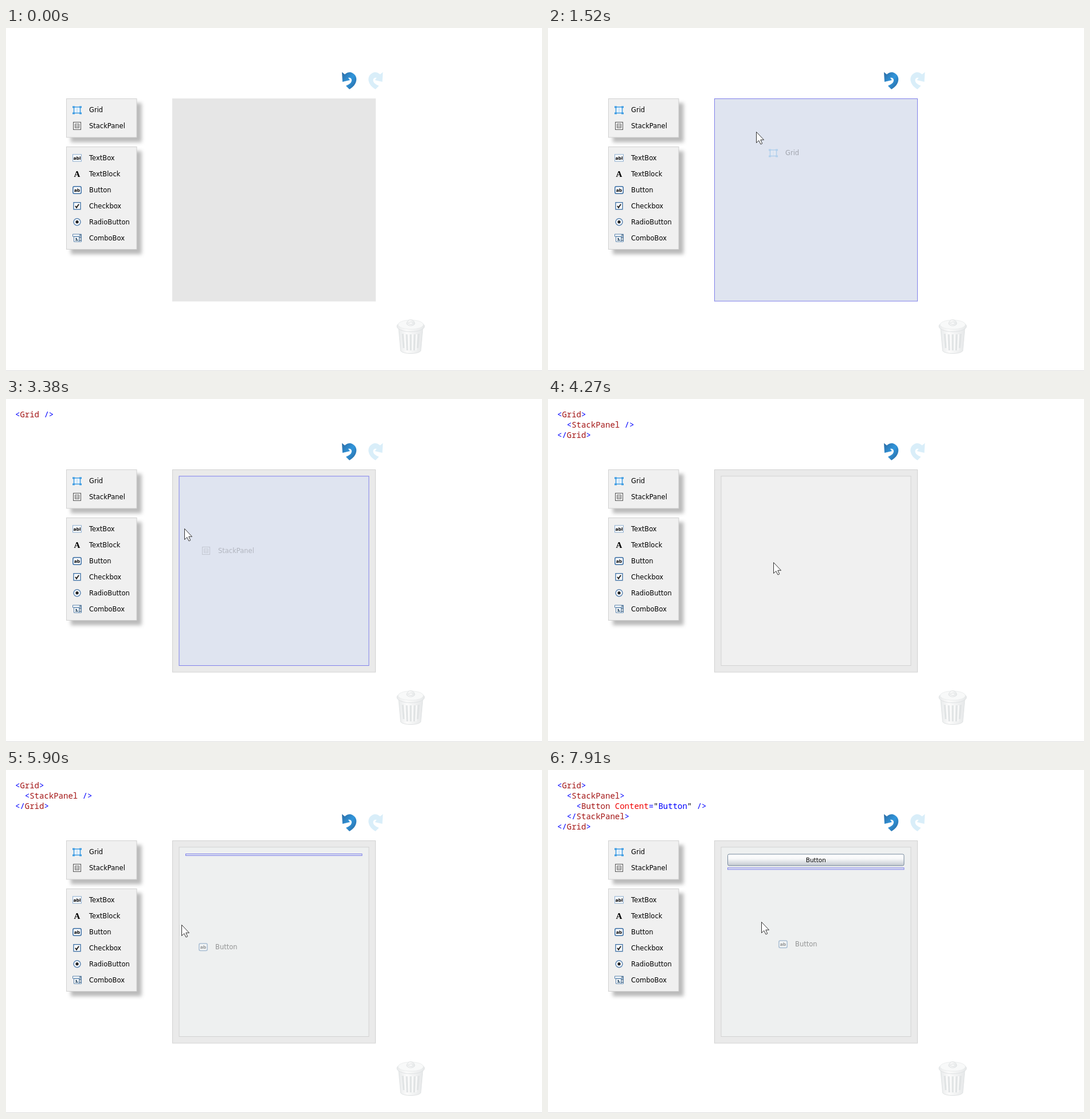
An HTML page that plays this animation: 935 by 599 pixels, repeating every 8 s.

```html
<!DOCTYPE html>
<html lang="en">
<head>
<meta charset="utf-8">
<title>Drag and drop designer</title>
<style>
  html, body { margin: 0; width: 100%; height: 100%; overflow: hidden; background: #fff; }
  svg { position: absolute; left: 0; top: 0; }
  text { font: 11.5px "DejaVu Sans", sans-serif; }
  pre { position: absolute; left: 16px; top: 18px; margin: 0;
        font: 14px/18px "Noto Sans Mono", monospace; color: #00f; }
  pre b { font-weight: normal; color: #a31515; }
  pre i { font-style: normal; color: #f00000; }
  pre u { text-decoration: none; color: #000; }
  .panel { fill: #f0f0f0; stroke: #d0d0d0; filter: drop-shadow(8px 8px 3px rgba(0, 0, 0, .27)); }
  .tiny { font-size: 7.5px; font-weight: bold; text-anchor: middle; }
</style>
</head>
<body>
<svg width="935" height="599" viewBox="0 0 935 599">
  <defs>
    <linearGradient id="blue" x2="1" y2="1">
      <stop stop-color="#2c6ba3"/><stop offset=".5" stop-color="#3196dc"/><stop offset="1" stop-color="#28649a"/>
    </linearGradient>
    <linearGradient id="face" x2="0" y2="1">
      <stop stop-color="#fff"/><stop offset=".4" stop-color="#f7f8f9"/><stop offset="1" stop-color="#c3c9d0"/>
    </linearGradient>
    <linearGradient id="metal">
      <stop stop-color="#e9ebec"/><stop offset=".35" stop-color="#fbfbfb"/><stop offset="1" stop-color="#e6e8e9"/>
    </linearGradient>
    <path id="arrow" d="M586 77l5 4c4-4 10-5 14-2 5 3 7 8 6 13-1 6-5 11-12 15l-6-6c7-3 10-6 10-10 0-3-3-5-6-4l3 4-13 3z"/>

    <g id="Grid-icon" fill="none" stroke="#3c9be2">
      <rect x="-5.5" y="-5" width="11" height="10.5" fill="#eaf4fc" stroke-width="1.5"/>
      <path d="M0-5V5" stroke="#8ac3ee" stroke-dasharray="2 1"/>
      <path d="M-8-5h4M4-5h4M-8 6h4M4 6h4" stroke-width="3"/>
    </g>
    <g id="StackPanel-icon" fill="none" stroke="#555">
      <rect x="-6.5" y="-6.5" width="13" height="13"/>
      <path d="M-3.5-3.5h7v7h-7zM-3-1h6M-3 1.5h6" stroke="#777"/>
    </g>
    <g id="TextBox-icon">
      <rect x="-7.5" y="-6" width="15" height="12" fill="#f8fbff" stroke="#8eaed0"/>
      <text class="tiny" y="3">abl</text>
    </g>
    <g id="TextBlock-icon">
      <text y="5" text-anchor="middle" style="font:bold 15px 'Liberation Serif',serif">A</text>
    </g>
    <g id="Button-icon">
      <rect x="-7.2" y="-6" width="14.4" height="12.4" rx="2.5" fill="#f8fbff" stroke="#3c6fa4" stroke-width="1.5"/>
      <text class="tiny" y="3">ab</text>
    </g>
    <g id="Checkbox-icon" fill="none">
      <rect x="-6" y="-6" width="12" height="12" fill="#fff" stroke="#4777a8" stroke-width="1.4"/>
      <path d="M-3 0l2 3 4-6" stroke="#222" stroke-width="2"/>
    </g>
    <g id="RadioButton-icon">
      <circle r="6" fill="#f8fbff" stroke="#6189b4" stroke-width="1.5"/><circle r="2.6" fill="#222"/>
    </g>
    <g id="ComboBox-icon" fill="#fff" stroke="#5680aa">
      <path d="M-7.5-6.5h15v4h-15zM-5.5-2.500h9v9h-9zM3.500-2.500h4v9h-4z"/>
      <path d="M-3 1h3M-3 4h5M-1 1v3M4-5h3M4 0h3M4 4h3" stroke="#35546f" stroke-width="1.5"/>
    </g>
  </defs>

  <path d="M0 598.500H935" stroke="#ddd"/>
  <use href="#arrow" fill="url(#blue)"/>
  <use href="#arrow" fill="#5ab4e4" opacity=".23" transform="matrix(-1 0 0 1 1243.500 0)"/>

  <g fill="url(#metal)" stroke="#dfe2e3">
    <path d="M685 525l3.500 39c5 6 30 6 35 0l3.500-39z"/>
    <path d="M692 534l2 25M699 535l1 28M706 535v28M713 535l-1 28M720 534l-2 25" stroke="#e0e3e4" stroke-width="3"/>
    <path d="M695 534l1.500 25M702 535l1 28M709 535v28M716 535l-1 28" stroke="#fafafa" stroke-width="2"/>
    <ellipse cx="706" cy="521" rx="24" ry="9.500"/>
    <ellipse cx="706" cy="518" rx="22" ry="8" fill="#f8f9f9" stroke="#eceeee"/>
    <path d="M699 517c0-10 14-10 14 0-3 4-11 4-14 0z"/>
    <ellipse cx="706" cy="515.500" rx="4" ry="2" fill="#fafafa"/>
  </g>

  <rect class="panel" x="105.500" y="123.500" width="122.500" height="67.500"/>
  <rect class="panel" x="105.500" y="207.500" width="122.500" height="179"/>
  <g id="toolbox"></g>

  <rect id="outer" x="290.500" y="123.500" width="354" height="353.500"/>
  <rect id="inner" x="302" y="134.800" width="331" height="330.700"/>
  <g id="button">
    <rect x="313.500" y="147" width="307.500" height="20" rx="2.500" fill="url(#face)" stroke="#75889c"/>
    <path d="M315 148.500H619.500" stroke="#fff"/>
    <text x="467.300" y="161" text-anchor="middle" style="font-size:10.500px">Button</text>
  </g>
  <rect id="marker" x="313.500" width="307.500" height="3" fill="#dfe4f0" stroke="#8080ea"/>
  <g id="ghost"><use id="ghostItem"/></g>
  <path id="cursor" d="M.5.5V19.500L4.800 15.500 8 22l2.800-1.300L7.800 14.300H13.500z" fill="#fff" stroke="#333"/>
</svg>
<pre id="code"></pre>

<script>
const $ = id => document.getElementById(id);
const set = (el, attrs) => { for (const k in attrs) el.setAttribute(k, attrs[k]); };
const show = (el, on) => { el.style.display = on ? '' : 'none'; };

const names = ['Grid', 'StackPanel', 'TextBox', 'TextBlock', 'Button', 'Checkbox', 'RadioButton', 'ComboBox'];
$('toolbox').innerHTML = names.map((name, i) => {
  const y = 143 + 27.95 * (i + (i > 1));
  return `<g transform="translate(124 ${y})"><g id="${name}">
    <use href="#${name}-icon"/><text x="21" y="4">${name}</text></g></g>`;
}).join('');

const highlight = xml => xml.replace(/(<\/?)(\w+)|(\w+)(?==)|"(\w+)"|[<>]/g, (all, open, tag, attr, value) =>
  tag ? open.replace('<', '&lt;') + `<b>${tag}</b>`
    : attr ? `<i>${attr}</i>`
    : value ? `<u>"</u>${value}<u>"</u>`
    : all.replace('>', '&gt;'));

const documents = [
  '',
  '<Grid />',
  '<Grid>\n  <StackPanel />\n</Grid>',
  '<Grid>\n  <StackPanel>\n    <Button Content="Button" />\n  </StackPanel>\n</Grid>'
].map(highlight);

// Pointer moves: first step, last step, number of steps, destination
const moves = [
  [190, 410, 3, 489, 309], [550, 990, 5, 150, 143],
  [1210, 1520, 4, 363, 181], [1630, 1740, 2, 395, 200],
  [2060, 2380, 4, 231, 168], [2520, 2740, 3, 174, 168],
  [2950, 2950, 1, 166, 172], [3060, 3380, 4, 311, 226],
  [3490, 3710, 3, 390, 284], [3840, 3840, 1, 393, 285],
  [4600, 5130, 6, 186, 278], [5260, 5260, 1, 167, 272],
  [5460, 5460, 1, 159, 274], [5570, 6140, 6, 380, 268],
  [6360, 6670, 4, 204, 274], [6780, 7140, 5, 165, 276],
  [7230, 7230, 1, 157, 276], [7340, 7910, 6, 372, 265]
];
// Drags: start, drop, item, ghost offset, ghost opacity
const drags = [
  [1210, 2060, 'Grid', 30, 37, .27], [2950, 4270, 'StackPanel', 38, 39, .2],
  [5460, 6360, 'Button', 38, 39, .38], [7230, 8000, 'Button', 38, 39, .38]
];

function pointer(t) {
  let x = 996, y = 706;
  for (const [start, end, steps, toX, toY] of moves) {
    if (t < start) break;
    const pace = (end - start) / (steps - 1 || 1) || 1;
    const p = Math.min(steps, Math.floor((t - start) / pace + .25) + 1) / steps;
    x += (toX - x) * p;
    y += (toY - y) * p;
    if (p < 1) break;
  }
  return [Math.round(x), Math.round(y)];
}

const hot = { fill: '#dfe4f0', stroke: '#8080ea' };
const empty = { fill: '#e6e6e6', stroke: '#e6e6e6' };
let shownStage = -1;

function draw(t) {
  const [x, y] = pointer(t);
  const stage = drags.filter(d => t >= d[1]).length;
  const drag = drags.find(d => t >= d[0] && t < d[1]);
  const over = drag && x >= (stage ? 302 : 290);

  if (stage !== shownStage) $('code').innerHTML = documents[shownStage = stage];
  set($('outer'), stage ? { fill: '#eaeaea', stroke: '#d2d2d2' } : over ? hot : empty);
  show($('inner'), stage);
  set($('inner'), stage > 1
    ? { fill: stage > 2 || over ? '#eef0f0' : '#f0f0f0', stroke: '#d2d2d2' }
    : over ? hot : empty);
  show($('button'), stage > 2);
  show($('marker'), stage > 1 && over);
  set($('marker'), { y: stage > 2 ? 170.8 : 146.5 });

  show($('ghost'), drag);
  if (drag) {
    const [, , name, dx, dy, opacity] = drag;
    set($('ghost'), { opacity, transform: `translate(${x + dx} ${y + dy})` });
    set($('ghostItem'), { href: '#' + name });
  }
  show($('cursor'), t >= 190);
  set($('cursor'), { transform: `translate(${x} ${y})` });
}

const began = performance.now();
(function tick() {
  draw((performance.now() - began) % 8000);
  requestAnimationFrame(tick);
})();
</script>
</body>
</html>
```
